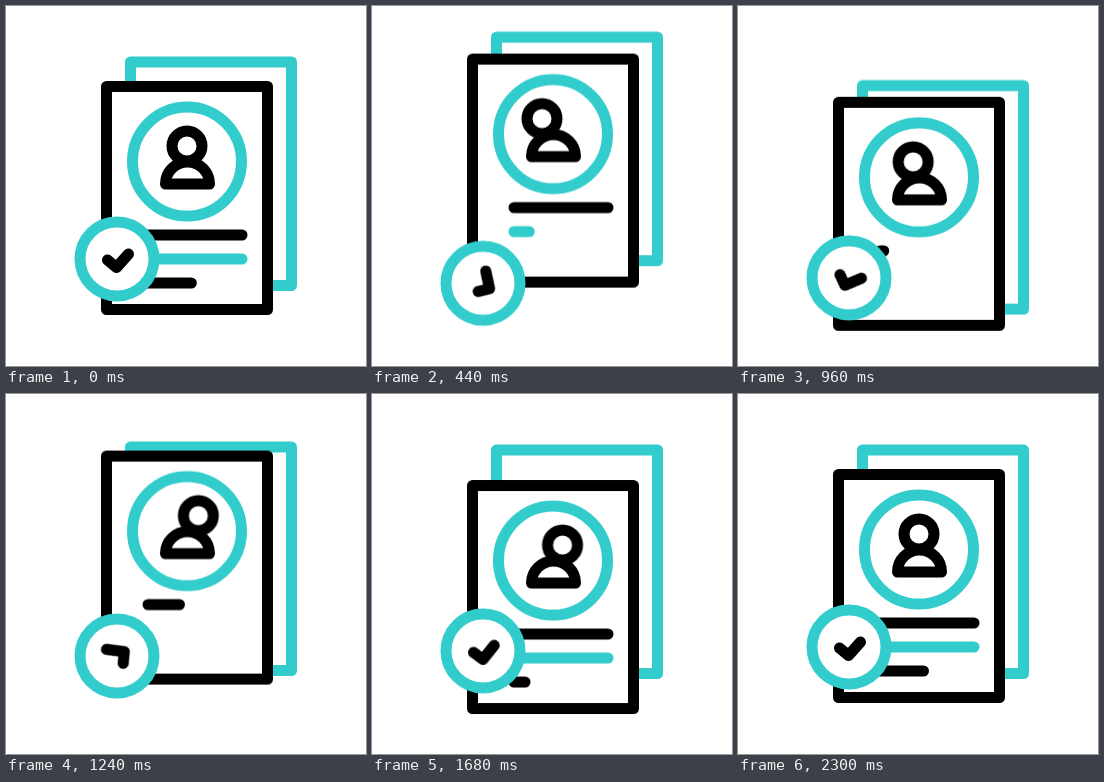
Animation of 360 by 360 pixels, one loop 2400 ms. Source, as an HTML page without scripts:

```html
<!DOCTYPE html>
<html lang="en">
<head>
<meta charset="utf-8">
<title>Approved profile</title>
<style>
  html, body { margin: 0; width: 100%; height: 100%; overflow: hidden; background: #fff; }
  svg { display: block; width: 100vw; height: 100vh; }
  svg * { animation: 2400ms cubic-bezier(.5, 0, .3, 1) infinite; }

  .ink { stroke: #000; }
  .teal { stroke: #33cccc; }
  .paper { fill: #fff; }
  .line { stroke-dasharray: 1 4; animation-timing-function: linear; }

  .back { animation-name: back; }
  .front { animation-name: front; }
  .head { animation-name: head; }
  .badge { animation-name: badge; }
  .check { animation-name: spin; animation-timing-function: cubic-bezier(.65, 0, .35, 1); transform-origin: 111px 253px; }
  .line1 { animation-name: line1; }
  .line2 { animation-name: line2; }
  .line3 { animation-name: line3; }

  @keyframes back {
    0%, 11.2% { transform: translateY(0); }
    22.3% { transform: translateY(-28.5px); }
    42.1% { transform: translateY(24px); }
    62.1% { transform: translateY(-19px); }
    79.5% { transform: translateY(14px); }
    95%, 100% { transform: translateY(0); }
  }
  @keyframes front {
    0%, 6.25% { transform: translateY(0); }
    21.7% { transform: translateY(-28.5px); }
    35.9% { transform: translateY(24px); }
    50.2% { transform: translateY(-19px); }
    64.7% { transform: translateY(16px); }
    80%, 100% { transform: translateY(0); }
  }
  @keyframes head {
    0%, 90%, 100% { transform: translateX(0); }
    30% { transform: translateX(-13.2px); }
    60% { transform: translateX(13.2px); }
  }
  @keyframes badge {
    0%, 90%, 100% { transform: translateY(0); }
    14.6% { transform: translateY(31px); }
    29.6% { transform: translateY(-20px); }
    44.2% { transform: translateY(22px); }
    62.5% { transform: translateY(-6px); }
    75% { transform: translateY(6px); }
  }
  @keyframes spin {
    0% { transform: rotate(0); }
    20% { transform: rotate(-54deg); }
    75%, 100% { transform: rotate(360deg); }
  }

  /* Lines retract bottom to top, then draw again top to bottom. */
  @keyframes line1 {
    0%, 20% { stroke-dashoffset: 0; }
    30.3%, 48.7% { stroke-dashoffset: .96; }
    58.5%, 100% { stroke-dashoffset: 0; }
  }
  @keyframes line2 {
    0%, 10% { stroke-dashoffset: 0; }
    20% { stroke-dashoffset: 1; }
    20.01%, 58.3% { stroke-dashoffset: 2; }
    58.31% { stroke-dashoffset: 1; }
    67.8%, 100% { stroke-dashoffset: 0; }
  }
  @keyframes line3 {
    0% { stroke-dashoffset: 0; }
    10% { stroke-dashoffset: 1; }
    10.01%, 67.5% { stroke-dashoffset: 2; }
    67.51% { stroke-dashoffset: 1; }
    77.5%, 100% { stroke-dashoffset: 0; }
  }
</style>
</head>
<body>
<svg viewBox="0 0 360 360" fill="none" stroke-width="11" stroke-linecap="round" stroke-linejoin="round">
  <rect class="back teal paper" x="124.5" y="56" width="161" height="223.5"/>
  <g class="front">
    <rect class="ink paper" x="100.5" y="80.5" width="161" height="223"/>
    <circle class="teal" cx="181" cy="155.5" r="54.5"/>
    <circle class="head ink" cx="181" cy="140" r="15"/>
    <path class="ink" d="M159.5 178H203.5a22 22 0 0 0-44 0Z"/>
    <path class="line line1 ink" pathLength="1" d="M142 229H236"/>
    <path class="line line2 teal" pathLength="1" d="M142 253H236"/>
    <path class="line line3 ink" pathLength="1" d="M142 277H185.5"/>
  </g>
  <g class="badge">
    <circle class="teal paper" cx="111" cy="253" r="37"/>
    <path class="check ink" d="M101.5 254l9 7.5 12-13.5"/>
  </g>
</svg>
</body>
</html>
```
